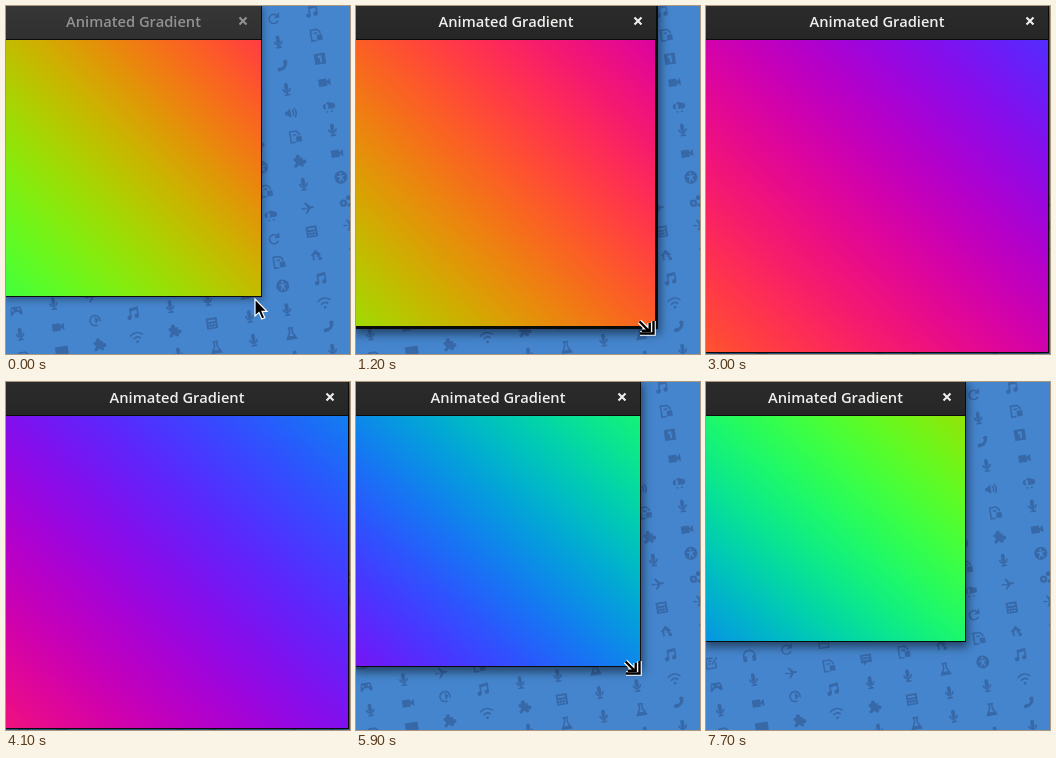
An HTML page that plays this animation: 344x348 px, repeating every 7.8 s.

```html
<!DOCTYPE html>
<html lang="en">
<head>
<meta charset="utf-8">
<title>Animated Gradient</title>
<style>
  html, body { margin: 0; width: 100%; height: 100%; overflow: hidden; }
  #stage { position: relative; width: 344px; height: 348px; overflow: hidden; background: #4585cd; }
  #stage > svg { position: absolute; left: 0; top: 0; width: 344px; height: 348px; }
  #win { position: absolute; left: 0; top: 0; background: #0b0b0b; box-shadow: 0 2px 7px 1px rgba(0, 0, 0, .35); }
  #win.active { box-shadow: 0 3px 9px 2px rgba(0, 0, 0, .5); }
  #bar { position: absolute; left: 0; top: 0; right: 1px; height: 33px; background: linear-gradient(#363636, #303030);
         color: #929292; font: 600 14.7px/31px "Open Sans", "Noto Sans", sans-serif; text-align: center; white-space: nowrap; }
  .active #bar { background: linear-gradient(#2b2b2b, #262626); color: #eeeeec; }
  #bar svg { position: absolute; right: 13px; top: 10px; width: 10px; height: 10px; }
  #view { position: absolute; left: 0; top: 34px; }
</style>
</head>
<body>
<div id="stage">
  <svg id="desk" viewBox="0 0 344 348"></svg>
  <div id="win">
    <div id="bar">Animated Gradient
      <svg viewBox="0 0 10 10"><path d="M1.5 1.5 8.5 8.5M8.5 1.5 1.5 8.5" stroke="currentColor" stroke-width="2.1"/></svg>
    </div>
    <div id="view"></div>
  </div>
  <svg viewBox="0 0 344 348">
    <path id="arrow" d="M0 0V17L4 13.4 6.8 20 9.8 18.7 7 12.3H12Z" fill="#000" stroke="#fff" stroke-width="1.2"/>
    <g id="grip" fill="none">
      <path id="gripLine" d="M-15.5-13.5-6-4M-13-4.3H-5.3V-12M-15-1.5H-1.5V-14"/>
    </g>
  </svg>
</div>
<script>
const LOOP = 7800, STEP = 100;
const $ = id => document.getElementById(id);

// Wallpaper icons: [filled path, stroked path], centred on 0,0
const disc = (x, y, r) => `M${x - r} ${y}a${r} ${r} 0 1 0 ${2 * r} 0a${r} ${r} 0 1 0 ${-2 * r} 0Z`;
const ICONS = {
  m: ["M-2-5a2 2 0 0 1 4 0V0a2 2 0 0 1-4 0Z", "M-4-1a4 4 0 0 0 8 0M0 3V6M-3 6H3"],
  n: [disc(-4, 4, 2.4) + disc(4, 3, 2.4), "M-2.4 4V-5L5.6-6V3M-2.4-3.5 5.6-4.5"],
  r: ["M6-6V0H0Z", "M3-3A5 5 0 1 0 4 3"],
  f: ["M1 0H7V6H1Z", "M0 6H-5V-6H2L5-3V-1M-2-2H2"],
  o: ["M-6-6H6V6H-6ZM-2-3V-1H0V4H2V-4H0Z", ""],
  p: ["M3-6 6-5Q6 5-5 6L-6 3-3 1-1 2Q2 0 2-2L1-4Z", ""],
  c: ["M-6-4H3V4H-6ZM3-1 7-4V4L3 1Z", ""],
  s: ["M-6-2H-4L0-5V5L-4 2H-6Z", "M2-3Q4 0 2 3M4-5Q8 0 4 5"],
  l: [disc(-3, 0, 3) + "M-3-1a4 4 0 0 1 7-2a3 3 0 0 1 1 6H-3Z", "M-3 6H-1M2 6H4"],
  z: ["M-6-3H-3a2.3 2.3 0 1 1 4 0H4V0a2.3 2.3 0 1 1 0 4V7H1a2 2 0 1 0-4 0H-6V4a2 2 0 1 0 0-4Z", ""],
  a: [disc(0, 0, 7) + disc(0, -4, 1.3) + "M-4-2V-1L-1.3 0-3 5H-2L0 2 2 5H3L1.3 0 4-1V-2Z", ""],
  g: [disc(-2, 2, 4) + disc(-2, 2, 1.4) + disc(4, -3, 2.6) + disc(4, 5, 2), ""],
  t: ["M-7 0-5-1-3 0H0L-3-6H-1L3-1H6Q8 0 6 1H3L-1 6H-3L0 1H-6Z", ""],
  k: ["M-6-6H6V6H-6ZM-4-4V-2H4V-4ZM-4 0V1.5H-2V0ZM-1 0V1.5H1V0ZM2 0V1.5H4V0ZM-4 3V4.5H-2V3ZM-1 3V4.5H1V3ZM2 3V4.5H4V3Z", ""],
  h: ["M-6 0 0-6 6 0H4V2H1V-1H-2V5H-4V0Z" + disc(4, 4, 2), ""],
  w: [disc(0, 5, 1.5), "M-7-2Q0-8 7-2M-4 1.5Q0-2 4 1.5"],
  b: ["M-4 3H4L5 6H-5Z", "M-3-6H3M-1.5-6V-1L-5 6H5L1.5-1V-6"],
  d: ["M-7 0H-3V6H-7ZM3 0H7V6H3Z", "M-6 1V-1a6 5 0 0 1 12 0V1"],
  e: ["M-5-4H5Q8 4 6 5T2 2H-2Q-5 6-6 5T-5-4ZM-4-2V-1H-5V0H-4V1H-3V0H-2V-1H-3V-2Z" + disc(3, -1, 1.2), ""],
  x: ["M-6-5H6V4H0L-3 7V4H-6ZM-4-3V-2H4V-3ZM-4 0V1H3V0Z", ""],
  y: ["M-7-5H7V4H-7ZM-3 5H3V6H-3Z", ""],
  q: ["M0 0V-4L4 0 0 4Z", "M2 5.2A5.5 5.5 0 1 1 5 2"],
  v: ["", "M4 0V6H-6V-5H2M-4-2H0M-4 1H-1M0 2 6-5"]
};
// Each wallpaper column: first row, then its icons downward
const COLUMNS = [[-1, "vemf"], [-1, "dmcy"], [-1, "rtqz"], [-1, "vfnw"], [0, "xmzm"], [0, "fmkb"],
  [0, "hbmm"], [-5, "zaflrfambm"], [-10, "rmpmsfzmtkhnwpm"], [-10, "nfoclmcagtm"]];

$("desk").innerHTML = COLUMNS.map(([first, kinds], i) => [...kinds].map((kind, n) => {
  const j = first + n, x = 10 + 37.5 * i + 4.2 * j, y = 304.5 - 6.9 * i + 23.7 * j;
  const [fill, line] = ICONS[kind];
  return `<g transform="translate(${x.toFixed(1)} ${y.toFixed(1)}) rotate(-9) scale(.92)">` +
    `<path d="${fill}" fill="#3768a8" fill-rule="evenodd"/>` +
    `<path d="${line}" fill="none" stroke="#3768a8" stroke-width="1.7"/></g>`;
}).join("")).join("");

// White halo behind the resize pointer
const halo = $("gripLine").cloneNode();
halo.removeAttribute("id");
$("grip").prepend(halo);
const pen = (el, color, width) => { el.setAttribute("stroke", color); el.setAttribute("stroke-width", width); };
pen(halo, "#fff", 4.6);
pen($("gripLine"), "#000", 2.4);

// Keys: [ms, x, y]
const SIZE = [[0, 255, 290], [400, 255, 290], [800, 277, 303], [1200, 300, 321], [1600, 328, 339], [1800, 340, 346],
  [2500, 340, 346], [2700, 342, 346], [4800, 342, 346], [5200, 324, 323], [5600, 302, 303], [6300, 259, 259]];
const POINTER = [[0, 249, 293], [200, 253, 297], [400, 254, 298], [800, 276, 311], [1200, 299, 329], [1600, 330, 350],
  [1800, 352, 372], [4700, 352, 372], [4900, 341, 351], [5200, 325, 334], [5600, 303, 312], [6300, 260, 268],
  [6500, 250, 255], [6700, 190, 169], [7100, 40, 130], [7200, -20, 110]];

function at(keys, t) {
  const k = keys.findIndex(key => key[0] > t);
  if (k < 0) return keys[keys.length - 1].slice(1);
  const a = keys[k - 1], b = keys[k], u = (t - a[0]) / (b[0] - a[0]);
  return [1, 2].map(c => Math.round(a[c] + (b[c] - a[c]) * u));
}

function sinebow(h) {
  const part = shift => Math.round(255 * Math.sin(Math.PI * (.5 - h + shift / 3)) ** 2);
  return `rgb(${part(0)},${part(1)},${part(2)})`;
}

function draw(t) {
  const [right, bottom] = at(SIZE, t), [x, y] = at(POINTER, t);
  const dragging = (t > 400 && t < 1800) || (t > 4800 && t < 5200);
  const edge = dragging ? 2 : 1, hue = -.005 - t / 10000;
  const win = $("win"), view = $("view");
  win.className = t >= 400 ? "active" : "";
  win.style.width = right + edge - 0 + "px";
  win.style.height = bottom + edge + "px";
  $("bar").style.right = edge + "px";
  view.style.width = right - (edge - 1) + "px";
  view.style.height = bottom - 34 - (edge - 1) + "px";
  const stops = Array.from({ length: 17 }, (_, i) => sinebow(hue + (1 - i / 16) / 3));
  view.style.background = `linear-gradient(to top right, ${stops})`;

  const grip = t >= 300 && t < 6400;
  for (const [id, on] of [["arrow", !grip && t < 7200], ["grip", grip]]) {
    $(id).setAttribute("transform", `translate(${x} ${y})`);
    $(id).style.display = on ? "" : "none";
  }
}

const start = performance.now();
let last = -1;
function tick() {
  const t = Math.floor((performance.now() - start) % LOOP / STEP) * STEP;
  if (t !== last) draw(last = t);
  requestAnimationFrame(tick);
}
tick();
</script>
</body>
</html>
```
